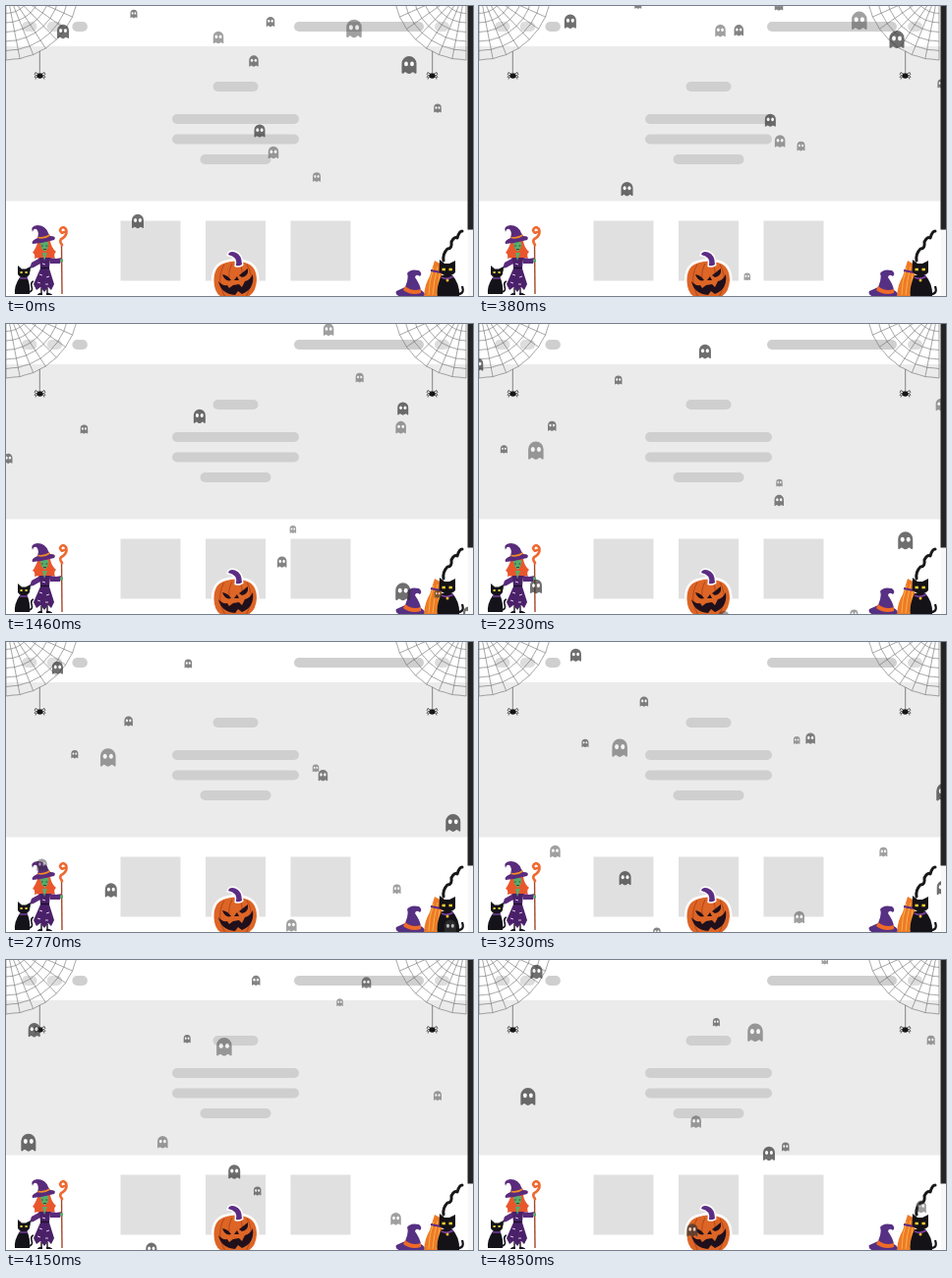
Write an HTML page that moves like this. It is 475x295 px and loops after 4.92 s.

```html
<!DOCTYPE html>
<html lang="en">
<head>
<meta charset="utf-8">
<title>Halloween page</title>
<style>
  html, body { margin: 0; width: 100%; height: 100%; overflow: hidden; background: #fff; }
  svg { display: block; width: 475px; height: 295px; }
</style>
</head>
<body>
<svg viewBox="0 0 475 295" xmlns="http://www.w3.org/2000/svg">
  <defs>
    <clipPath id="page"><rect width="470" height="295"/></clipPath>
    <g id="ghost">
      <path fill="#333" d="M-10 11V-2A10 10 0 0 1 10-2V11Q8.5 12.5 7 10.5Q5 8.5 3.3 10.5Q0 13.5-3.3 10.5Q-5 8.5-7 10.5Q-8.5 12.5-10 11Z"/>
      <ellipse cx="-4" cy="-1.5" rx="2.6" ry="3.3" fill="#fff"/>
      <ellipse cx="4" cy="-1.5" rx="2.6" ry="3.3" fill="#fff"/>
    </g>
    <g id="corner">
      <path id="web" fill="none" stroke="#6c6c6c" stroke-width=".6"/>
      <path d="M34.3 46V68" stroke="#555" stroke-width=".7"/>
      <path d="M34 70L30 67.5L29 70M34 71L30 70.5L29 73M34 72L31 72L30 74.5M35 70L39 67.5L40 70M35 71L39 70.5L40 73M35 72L38 72L39 74.5" fill="none" stroke="#222" stroke-width=".7"/>
      <ellipse cx="34.5" cy="71" rx="3" ry="2.7" fill="#151515"/>
    </g>
  </defs>

  <rect width="475" height="295" fill="#fff"/>
  <rect y="41" width="470" height="157.5" fill="#ebebeb"/>
  <g id="pills" fill="#cfcfcf"></g>
  <g id="cards" fill="#e0e0e0"></g>
  <use href="#corner"/>
  <use href="#corner" transform="matrix(-1 0 0 1 468 0)"/>

  <g id="witch">
    <path d="M33 239Q30 247 27 251Q30 252 29 257Q34 255 35 259H44Q45 255 50 257Q48 252 51 250Q46 246 45 239Z" fill="#e9562c"/>
    <path d="M35 256L26 261L24 267L28 266L35 262ZM44 256L51 257L57 256L55 262L45 262Z" fill="#5a2b7c"/>
    <path d="M34 256H45L44 267L49 283L46 289L43 286L39 291L35 286L31 289L28 283L35 267Z" fill="#4a2169"/>
    <path d="M35 266.5H44" stroke="#1c1029" stroke-width="1.5"/>
    <path d="M34 273l3 1M41 276l3-1M32 281l3 1M40 283l3 0M37 262l3 1" stroke="#d9c7e6"/>
    <path d="M36 287V292M42 287V292" stroke="#333" stroke-width="1.6"/>
    <path d="M32 293.5Q34 291 37 292V294H32ZM41 292Q44 291 47 293.5V294H41Z" fill="#1b1424"/>
    <path d="M35 240H43Q44 246 39.5 250Q35 247 35 240Z" fill="#58ad6c"/>
    <path d="M36 244h1.8M40.5 244h1.8M38 247.5h3" stroke="#26332a" stroke-width=".8"/>
    <path d="M37 251L39 259L42 251Z" fill="#58ad6c"/>
    <path d="M32 236Q34 230 31 227Q28 226 27 230Q24 224 32 223Q40 223 43 231L45 234Q52 234 49 238Q38 241 27 242Q25 239 32 236Z" fill="#5a2b7c"/>
    <path d="M32.5 235.5Q39 237 44.5 233" stroke="#f08a24" stroke-width="1.6" fill="none"/>
    <path d="M57 293L56.5 241" stroke="#a5472a" stroke-width="1.4"/>
    <path d="M57 243Q53 238 58 236Q63 232 61 227Q57 223 55 228Q56 232 59 230" fill="none" stroke="#ee6a32" stroke-width="2.7" stroke-linecap="round"/>
    <path d="M55 259h3M23 268h2" stroke="#58ad6c" stroke-width="3"/>
  </g>
  <g id="kitten">
    <path d="M14 276Q8 285 9 293H24Q25 283 21 275Z" fill="#15131a"/>
    <path d="M12 273L12 264L16 267.5H20L25 265L24 273Q18 281 12 273Z" fill="#15131a"/>
    <path d="M22 291Q28 291 26 285Q25 281 28 280" fill="none" stroke="#15131a" stroke-width="1.6"/>
    <path d="M14.5 271h2.2M19.5 271h2.2" stroke="#e8d03a" stroke-width="1.8"/>
    <path d="M14 277H22" stroke="#7c3fa5" stroke-width="1.4"/>
  </g>

  <g id="pumpkin">
    <path d="M211.5 280Q211 264 224 261Q233 258 243 261Q255 264 255 279Q254 295 242 297H223Q212 295 211.5 280Z" fill="#dd6526" stroke="#fff" stroke-width="5" paint-order="stroke"/>
    <path d="M222 263Q213 278 223 296M245 263Q254 278 244 296M230 262Q226 270 227 276M238 262Q241 270 240 276" fill="none" stroke="#b84a1c" stroke-width="1.1"/>
    <path d="M234 264Q236 255 226 253Q227 249 233 250.5Q240 253 240 263Q237 265 234 264Z" fill="#5c2c83" stroke="#fff" stroke-width="3" paint-order="stroke"/>
    <path d="M220 273Q226 274 229 279Q223 281 220 273ZM246 267Q247 275 240 276L237 274ZM232 279L235 275L237 279Z" fill="#20101c"/>
    <path d="M216 280Q220 285 225 284L227 287L231 284L237 283L240 286L243 280Q248 279 251 273Q253 288 240 293L236 290L233 294Q219 293 216 280Z" fill="#20101c"/>
  </g>

  <g id="broom-cat">
    <path d="M445 259Q444 252 449 247Q454 247 453 240Q456 234 459 236Q461 229 464 229" fill="none" stroke="#1a1718" stroke-width="3" stroke-linecap="round" stroke-linejoin="round"/>
    <path d="M436 259L443 263Q444 282 441 295H425Q426 283 431 275Z" fill="#ee7a25"/>
    <path d="M435 266Q430 280 430 294M439 265Q435 280 434 294M441 272Q440 284 438 294" stroke="#f6b04a" fill="none"/>
    <path d="M432 269L442 271" stroke="#5a2b86" stroke-width="1.8"/>
    <path d="M406 286Q410 277 408 272Q411 267 420 269Q424 272 421 275Q417 272 416 276Q421 283 422 289Q428 292 424 296H402Q395 294 397 290Z" fill="#563083"/>
    <path d="M406 285Q413 291 422 288V292Q412 295 404 289Z" fill="#ee6a28"/>
    <path d="M443 274Q437 287 439 296H461Q462 283 454 274Z" fill="#141217"/>
    <path d="M440.5 270L441 258L446 262H451L457 259L457 271Q449 279 440.5 270Z" fill="#141217"/>
    <path d="M458 293Q467 294 464 285" fill="none" stroke="#141217" stroke-width="2.2"/>
    <path d="M443.5 268h3.4M450.5 268h3.4" stroke="#f6d02f" stroke-width="2.5"/>
    <path d="M443 276Q449 279 455 275" stroke="#7c3fa5" stroke-width="1.7" fill="none"/>
    <circle cx="449" cy="279" r="1.5" fill="#f6b92f"/>
  </g>

  <g id="ghosts" clip-path="url(#page)"></g>
  <rect x="470" y="227" width="5" height="68" fill="#f7f7f7"/>
  <rect x="469.5" width="5.5" height="227.5" fill="#242424"/>
</svg>
<script>
const NS = 'http://www.w3.org/2000/svg';
const W = 470, H = 295, LOOP = 4920, FPS = 13;

const $ = id => document.getElementById(id);
const add = (parent, tag, attrs) => {
  const el = document.createElementNS(NS, tag);
  for (const key in attrs) el.setAttribute(key, attrs[key]);
  return parent.appendChild(el);
};

// Page skeleton: menu, centred text lines, three cards
const pill = (x, y, width, opacity = 1) =>
  add($('pills'), 'rect', { x, y, width, height: 10, rx: 5, opacity });
for (let i = 0; i < 3; i++) {
  pill(16 + 25.7 * i, 16, 15.5, i < 2 ? .7 : 1);
  add($('cards'), 'rect', { x: 116.5 + 86.5 * i, y: 218.5, width: 61, height: 61 });
}
pill(293, 16, 132);
pill(436, 16, 15, .7);
pill(210.5, 77, 46);
[129, 129, 72].forEach((width, i) => pill(233.5 - width / 2, 110 + 20.5 * i, width));

// Cobweb: spokes and sagging rings around a point above the corner
function webPath() {
  const step = 11;
  const at = (r, deg) => {
    const a = deg * Math.PI / 180;
    return `${(r * Math.cos(a)).toFixed(1)} ${(r * Math.sin(a) - 19).toFixed(1)}`;
  };
  let d = '';
  for (let deg = 13; deg <= 90; deg += step) d += `M0 -19L${at(74, deg)}`;
  for (let r = 74; r > 20; r -= 9.5) {
    d += `M${at(r, 2)}`;
    for (let deg = 13; deg <= 90; deg += step) d += `Q${at(r * .99, deg - step / 2)} ${at(r, deg)}`;
  }
  return d;
}
$('web').setAttribute('d', webPath());

// Ghosts by opacity: width, start x y, velocity x y (px/s), then where each re-entry happens
const flock = {
  .7: [
    [15, 410, 60, 39, -67.5, 386, 239],
    [11, 258, 127, 99.7, -28, 42.6, 124],
    [12, 134, 219, 43, -85.6, 446, 141],
    [12, 58, 26, 90.6, -26.8, 448, 286]
  ],
  .6: [
    [7, 130, 8, 82.6, -24.5, 358, 136],
    [9.5, 252, 56, 31.9, -81.4, 258],
    [8.5, 269, 16, 93.6, -43.1, 389, 140],
    [7.5, 439, 104, 81, -65, 174, 176]
  ],
  .46: [
    [15.5, 354, 23, 85.3, -21, 145],
    [10.5, 216, 32, 76.7, -18, 238],
    [10.5, 272, 149, 88.7, -30, 241],
    [8, 316, 174, 29.9, -81.7, 380],
    [6.5, 266, 299, 17.7, -61.6]
  ]
};

// Off the right edge a ghost returns on the left, off the top it returns at the bottom
function route(r, x, y, vx, vy, entries) {
  const legs = [{ from: 0, x, y }];
  let from = 0;
  for (const entry of entries) {
    const right = (W + r - x) / vx, top = (y + r) / -vy;
    from += Math.min(right, top);
    [x, y] = right < top ? [-r, entry] : [entry, H + r];
    legs.push({ from, x, y });
  }
  return legs;
}

const ghosts = Object.entries(flock).flatMap(([opacity, rows]) =>
  rows.map(([width, x, y, vx, vy, ...entries]) => ({
    el: add($('ghosts'), 'use', { href: '#ghost', opacity }),
    legs: route(width * .53, x, y, vx, vy, entries),
    scale: width / 20, vx, vy
  })));

function draw(ms) {
  // 13 pictures a second, with delays rounded to 10 ms
  const tick = Math.floor(ms % LOOP / 10) * 10 + 5;
  const t = Math.floor(tick * FPS / 1000) / FPS;
  for (const { el, legs, scale, vx, vy } of ghosts) {
    const leg = legs.filter(l => l.from <= t).pop(), dt = t - leg.from;
    const x = leg.x + vx * dt, y = leg.y + vy * dt;
    el.setAttribute('transform', `translate(${x.toFixed(2)} ${y.toFixed(2)}) scale(${scale})`);
  }
}

const start = performance.now();
function frame() {
  draw(performance.now() - start);
  requestAnimationFrame(frame);
}
frame();
</script>
</body>
</html>
```
